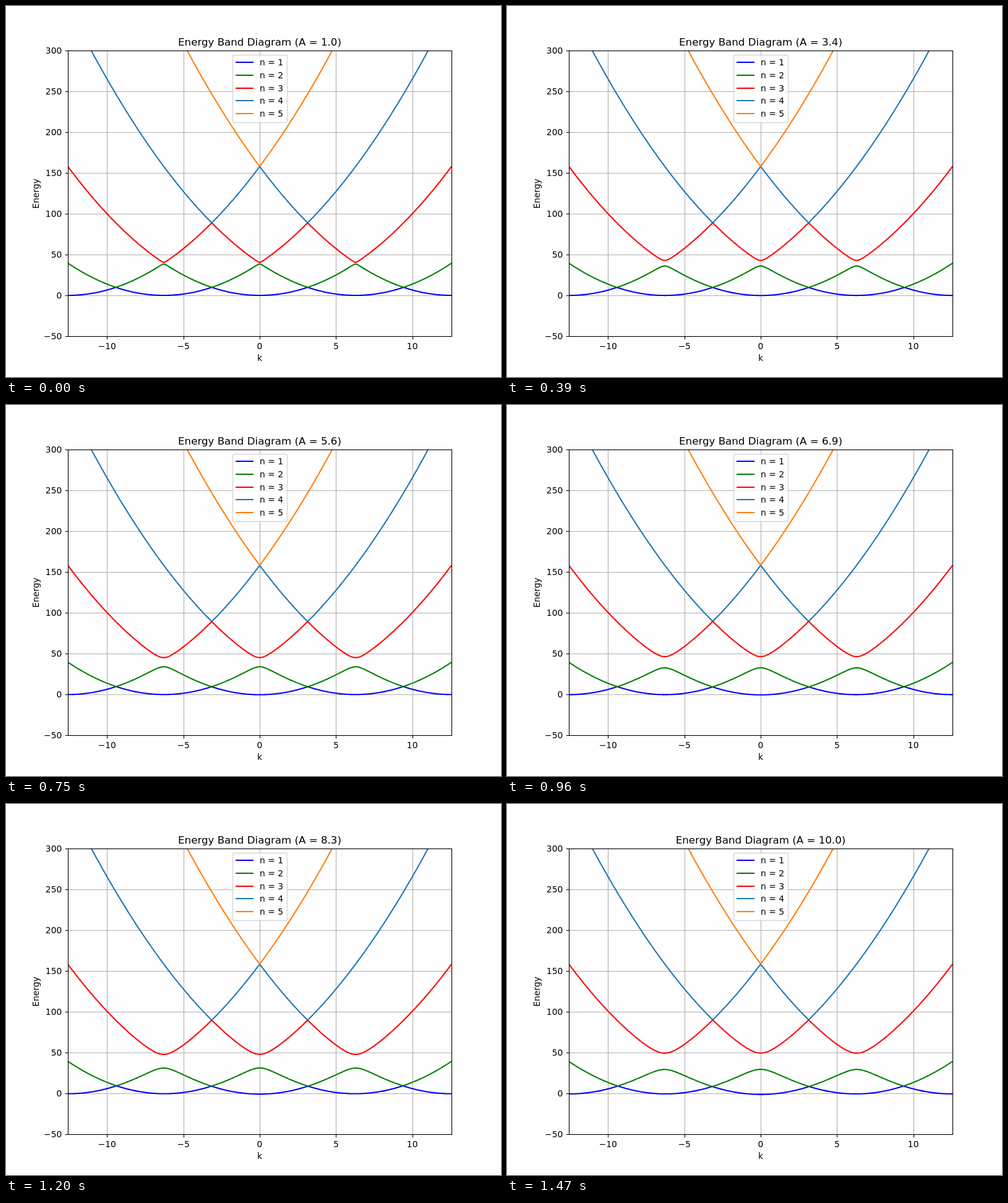
These frames come from a looping animation (800 px wide and 600 px high, 1500 ms). An HTML page with a canvas:

```html
<!DOCTYPE html>
<html>
<head>
<meta charset="utf-8">
<style>
  html, body { margin: 0; width: 100%; height: 100%; overflow: hidden; background: #fefefe; }
  canvas { display: block; }
</style>
</head>
<body>
<canvas id="stage" width="800" height="600"></canvas>
<script>
const ctx = document.getElementById('stage').getContext('2d');
const PI = Math.PI, K_MAX = 4 * PI, SAMPLES = 500;
const STEP_MS = 30, STEPS = 50;
const LEFT = 100, RIGHT = 720, TOP = 72, BOTTOM = 534;
const COLORS = ['#0000ff', '#008000', '#ff0000', '#1f77b4', '#ff7f0e'];
const X_TICKS = [-10, -5, 0, 5, 10];
const Y_TICKS = [-50, 0, 50, 100, 150, 200, 250, 300];

const toX = k => 410 + 310 * k / K_MAX;
const toY = energy => 468 - 1.32 * energy;
const snap = v => Math.round(v) + 0.5;
const label = n => String(n).replace('-', '\u2212');

// Plane waves n = -2..2, where A couples waves whose indices differ by two.
function energies(k, A) {
  const [a, b, c, d, e] = [-2, -1, 0, 1, 2].map(n => (k + 2 * PI * n) ** 2);

  const mid = (b + d) / 2, gap = Math.hypot((b - d) / 2, A);

  const mean = (a + c + e) / 3;
  const [u, v, w] = [a - mean, c - mean, e - mean];
  const p = Math.sqrt((u * u + v * v + w * w + 4 * A * A) / 6);
  const r = (u * v * w - A * A * (u + w)) / (2 * p ** 3);
  const phi = Math.acos(Math.max(-1, Math.min(1, r))) / 3;
  const triple = [0, 1, 2].map(j => mean + 2 * p * Math.cos(phi + 2 * PI * j / 3));

  return [mid - gap, mid + gap, ...triple].sort((x, y) => x - y);
}

function line(x1, y1, x2, y2, color, width) {
  ctx.strokeStyle = color;
  ctx.lineWidth = width;
  ctx.beginPath();
  ctx.moveTo(x1, y1);
  ctx.lineTo(x2, y2);
  ctx.stroke();
}

function text(str, x, y, align = 'center', size = 13.889) {
  ctx.font = `${size}px "DejaVu Sans", sans-serif`;
  ctx.textAlign = align;
  ctx.fillStyle = '#000';
  ctx.fillText(str, x, y);
}

function drawGrid() {
  for (const k of X_TICKS) line(snap(toX(k)), TOP, snap(toX(k)), BOTTOM, '#b0b0b0', 1.11);
  for (const e of Y_TICKS) line(LEFT, snap(toY(e)), RIGHT, snap(toY(e)), '#b0b0b0', 1.11);
}

function drawBands(A) {
  const points = Array.from({ length: SAMPLES + 1 }, (_, i) => {
    const k = K_MAX * (2 * i / SAMPLES - 1);
    return { x: toX(k), bands: energies(k, A) };
  });
  ctx.save();
  ctx.beginPath();
  ctx.rect(LEFT, TOP, RIGHT - LEFT, BOTTOM - TOP);
  ctx.clip();
  ctx.lineWidth = 2.083;
  ctx.lineJoin = 'round';
  COLORS.forEach((color, n) => {
    ctx.strokeStyle = color;
    ctx.beginPath();
    for (const { x, bands } of points) ctx.lineTo(x, toY(bands[n]));
    ctx.stroke();
  });
  ctx.restore();
}

function drawAxes() {
  for (const k of X_TICKS) {
    const x = snap(toX(k));
    line(x, BOTTOM + 0.5, x, BOTTOM + 5.36, '#000', 1.11);
    text(label(k), toX(k), 555);
  }
  for (const e of Y_TICKS) {
    const y = snap(toY(e));
    line(LEFT + 0.5, y, LEFT - 4.36, y, '#000', 1.11);
    text(label(e), 90.3, Math.round(toY(e)) + 5, 'right');
  }
  ctx.lineWidth = 1.11;
  ctx.strokeRect(LEFT + 0.5, TOP + 0.5, RIGHT - LEFT, BOTTOM - TOP);

  text('k', 410, 574);
  ctx.save();
  ctx.translate(53, 303.5);
  ctx.rotate(-PI / 2);
  text('Energy', 0, 0);
  ctx.restore();
}

function drawLegend() {
  ctx.beginPath();
  ctx.roundRect(366.5, 79.5, 88, 109, 2.8);
  ctx.fillStyle = 'rgba(255,255,255,0.8)';
  ctx.fill();
  ctx.strokeStyle = 'rgba(204,204,204,0.8)';
  ctx.lineWidth = 1.39;
  ctx.stroke();
  COLORS.forEach((color, n) => {
    const y = Math.round(91 + 20.75 * n);
    line(371, y, 400, y, color, 2.083);
    text(`n = ${n + 1}`, 410, y + 5, 'left');
  });
}

function draw() {
  const step = Math.floor(performance.now() / STEP_MS) % STEPS;
  const A = 1 + 9 * step / (STEPS - 1);
  ctx.fillStyle = '#fefefe';
  ctx.fillRect(0, 0, 800, 600);
  drawGrid();
  drawBands(A);
  drawAxes();
  drawLegend();
  text(`Energy Band Diagram (A = ${A.toFixed(1)})`, 410, 64, 'center', 16.667);
  requestAnimationFrame(draw);
}
draw();
</script>
</body>
</html>
```
